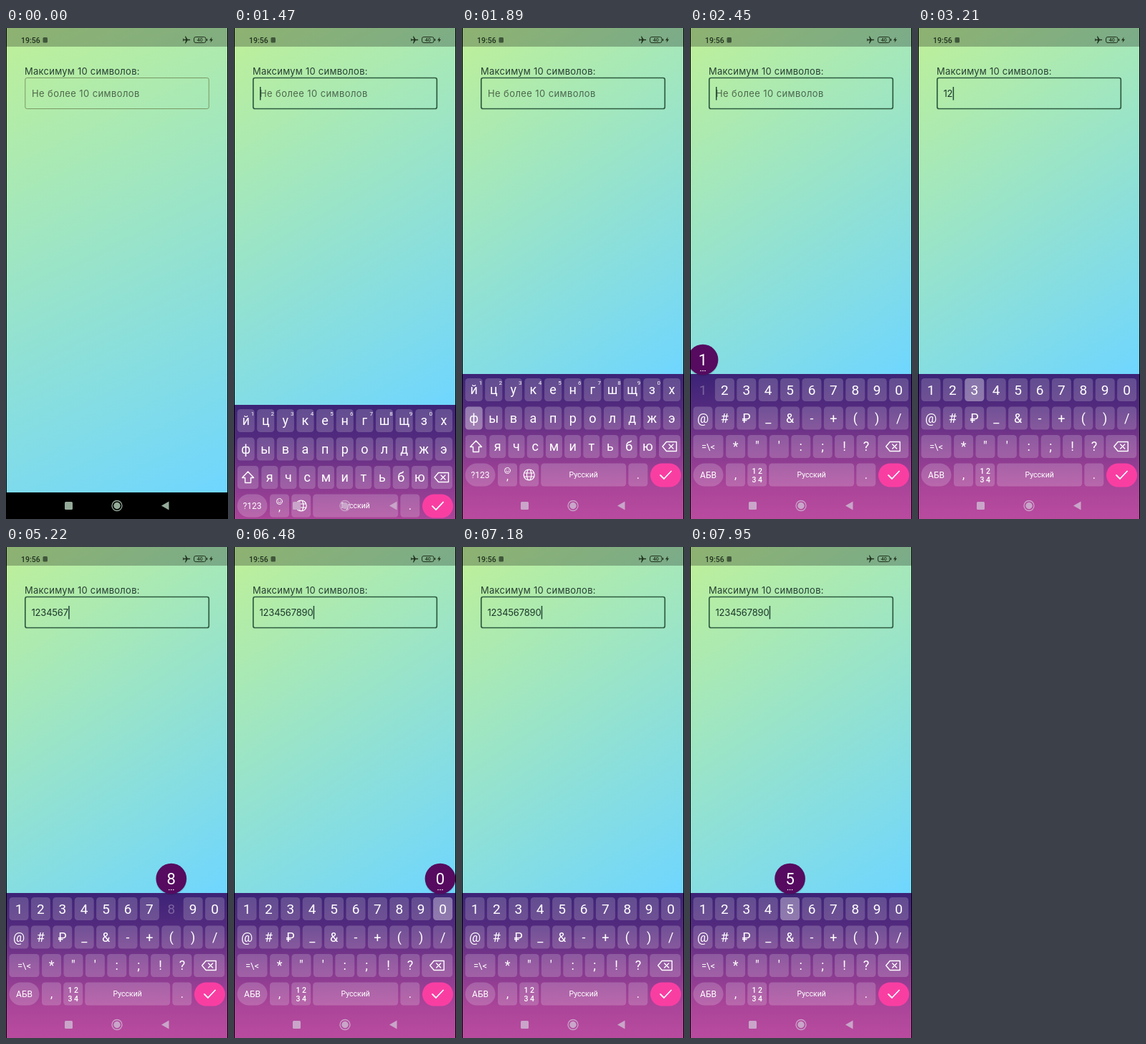
Animation of 310x684 px, one loop 8 s. Source, as an HTML page:

```html
<!DOCTYPE html>
<html lang="ru">
<head>
<meta charset="utf-8">
<title>Поле ввода</title>
<style>
html, body { margin: 0; width: 100%; height: 100%; overflow: hidden; background: #000; }
svg { display: block; width: 310px; height: 684px; }
text { font-family: Roboto, "Noto Sans", sans-serif; white-space: pre; }
.form text { font-family: Inter, Roboto, sans-serif; font-size: 13px; }
.label { fill: #263f32; letter-spacing: .25px; }
.hint { fill: #000; fill-opacity: .56; letter-spacing: .4px; }
.form .value { fill: #1c382b; letter-spacing: -.2px; }
.status { fill: #22321f; }
.kb text { fill: #fff; text-anchor: middle; }
.kb .line { fill: none; stroke: #fff; stroke-width: 1.4; stroke-linejoin: round; stroke-linecap: round; }
.cap { fill: #fff; fill-opacity: .19; }
.hot .cap { fill-opacity: .38; }
.down { opacity: .28; }
.down .cap { fill-opacity: 0; }
</style>
</head>
<body>
<svg viewBox="0 0 310 684">
  <defs>
    <linearGradient id="sky" gradientUnits="userSpaceOnUse" x1="1" y1="0" x2="309" y2="647">
      <stop offset="0" stop-color="#bff098"/><stop offset="1" stop-color="#6fd6ff"/>
    </linearGradient>
    <linearGradient id="plum" x1="0" y1="0" x2="0" y2="1">
      <stop offset="0" stop-color="#3c2376"/><stop offset=".25" stop-color="#542b7f"/>
      <stop offset=".5" stop-color="#80388e"/><stop offset=".78" stop-color="#aa4599"/>
      <stop offset="1" stop-color="#b94b9f"/>
    </linearGradient>
    <clipPath id="screen"><rect x="1" width="308" height="684"/></clipPath>
  </defs>
  <rect width="310" height="684"/>
  <g clip-path="url(#screen)">
    <rect id="page" x="1" width="308" height="647" fill="url(#sky)"/>
    <rect x="1" width="308" height="26" fill-opacity=".26"/>
    <g class="status">
      <text x="21" y="20.5" font-size="10.5" font-weight="500">19:56</text>
      <rect x="51.5" y="13" width="6.5" height="7.5" rx="1.5" fill="#40563a"/>
      <path transform="translate(252 16.5) rotate(90) scale(.52) translate(-11.5 -12)" d="M21 16v-2l-8-5V3.5c0-.83-.67-1.5-1.5-1.5S10 2.67 10 3.5V9l-8 5v2l8-2.5V19l-2 1.5V22l3.5-1 3.5 1v-1.5L13 19v-5.5l8 2.5z"/>
      <rect x="262.5" y="12.5" width="16.5" height="8" rx="2.5" fill="none" stroke="#22321f"/>
      <rect x="279.8" y="15" width="1.4" height="3"/>
      <text x="270.7" y="19" font-size="7" font-weight="500" text-anchor="middle">40</text>
      <path d="M287.5 12.5l-3.5 4.700h2.200l-.7 3.300 3.500-4.700h-2.200z"/>
    </g>
    <g class="form">
      <text class="label" x="26" y="64.500">Максимум 10 символов:</text>
      <rect id="field" x="26.800" y="69.500" width="256.500" height="43" rx="2.500" fill="none"/>
      <text id="hint" class="hint" x="36" y="96">Не более 10 символов</text>
      <text id="value" class="value" x="35.500" y="96"></text>
      <rect id="caret" y="82" width="1.500" height="18.500" fill="#24483a"/>
    </g>
    <g id="kb" class="kb">
      <rect x="1" y="482" width="308" height="202" fill="url(#plum)"/>
      <g id="letters"></g>
      <g id="symbols"></g>
      <g id="common"></g>
      <g id="popup">
        <circle cy="463" r="21.800" fill="#000" opacity=".12"/>
        <circle cy="462" r="21.300" fill="#560a60"/>
        <text id="big" y="470" font-size="22"></text>
        <g fill="#fff"><circle cx="-3" cy="477.500" r=".8"/><circle cy="477.500" r=".8"/><circle cx="3" cy="477.500" r=".8"/></g>
      </g>
    </g>
    <g id="nav">
      <rect x="82" y="660" width="11" height="11" rx="1.500"/>
      <circle cx="155" cy="665.500" r="4.700"/>
      <circle cx="155" cy="665.500" r="7" fill="none" stroke-width="1.300"/>
      <path d="M217 665.500L227.500 659.500V671.500Z"/>
    </g>
  </g>
</svg>
<script>
const $ = id => document.getElementById(id);
const NS = 'http://www.w3.org/2000/svg';

function add(parent, tag, attrs, text) {
  const el = document.createElementNS(NS, tag);
  for (const k in attrs) el.setAttribute(k, attrs[k]);
  if (text) el.textContent = text;
  return parent.appendChild(el);
}

const keys = {};
const TOPS = [488, 527.5, 567, 606.5];

// One key: cap centred on cx, optional glyph
function key(layer, id, cx, row, w, size = 18, glyph = id, rx = 4.5) {
  const g = add(layer, 'g', {}), y = TOPS[row];
  add(g, 'rect', { class: 'cap', x: cx - w / 2, y, width: w, height: 32, rx });
  if (glyph) add(g, 'text', { x: cx, y: y + 16 + size * .36, 'font-size': size }, glyph);
  return keys[id] = { g, cx };
}

function keyRow(layer, chars, row, first, pitch, w, size) {
  [...chars].forEach((c, i) => key(layer, c, first + i * pitch, row, w, size));
}

function backspace(layer, cx, w) {
  const { g } = key(layer, 'back' + cx, cx, 2, w, 0, '');
  add(g, 'path', { class: 'line', d: `M${cx - 10} 583l5.500-6.500h14v13h-14zM${cx - 1} 580l6 6m0-6l-6 6` });
}

const letters = $('letters'), symbols = $('symbols'), common = $('common');

keyRow(letters, 'йцукенгшщзх', 0, 16.6, 27.63, 24.2, 18);
[...'1234567890'].forEach((d, i) =>
  add(letters, 'text', { x: 26 + i * 27.63, y: 496.5, 'font-size': 8 }, d));
keyRow(letters, 'фывапролджэ', 1, 16.6, 27.63, 24.2, 18);
const shift = key(letters, 'shift', 19.5, 2, 29.5, 0, '');
add(shift.g, 'path', { class: 'line', d: 'M19.500 575l-8 8.500h4v7h8v-7h4z' });
keyRow(letters, 'ячсмитьбю', 2, 49.8, 26.2, 23, 18);
backspace(letters, 290, 30);
key(letters, 'mode', 25.5, 3, 42, 12, '?123', 16);
const comma = key(letters, 'smile', 63.5, 3, 27, 0, '');
add(comma.g, 'circle', { class: 'line', cx: 63.5, cy: 616.5, r: 4, 'stroke-width': 1 }).style.strokeWidth = 1;
add(comma.g, 'path', { class: 'line', d: 'M61.500 617.500q2 2 4 0M62 615.200v.1M65 615.200v.1' }).style.strokeWidth = 1;
add(comma.g, 'text', { x: 63.5, y: 630, 'font-size': 15 }, ',');
const globe = key(letters, 'globe', 93.7, 3, 27, 0, '');
add(globe.g, 'path', { class: 'line',
  d: 'M86.200 622.500a7.500 7.500 0 1 0 15 0a7.500 7.500 0 1 0-15 0M90.500 622.500a3.200 7.500 0 1 0 6.400 0a3.200 7.500 0 1 0-6.400 0M87 620h13.400M87 625h13.400' })
  .style.strokeWidth = 1.2;

keyRow(symbols, '1234567890', 0, 18, 30.4, 27, 19);
keyRow(symbols, '@#₽_&-+()/', 1, 18, 30.4, 27, 18);
key(symbols, 'more', 25.5, 2, 42, 13, '=\\<');
keyRow(symbols, '*"\':;!?', 2, 63.6, 30.4, 27, 18);
backspace(symbols, 283.7, 43);
key(symbols, 'abc', 25.5, 3, 42, 12, 'АБВ', 16);
key(symbols, ',', 63.5, 3, 27, 16);
const pad = key(symbols, 'pad', 93.7, 3, 27, 0, '');
['1 2', '3 4'].forEach((s, i) =>
  add(pad.g, 'text', { x: 93.7, y: 621 + i * 11.5, 'font-size': 10.5, 'font-weight': 500 }, s));

key(common, 'space', 169.7, 3, 119, 10.5, 'Русский');
key(common, '.', 245.8, 3, 27, 16);
add(common, 'rect', { x: 263, y: 606.5, width: 43, height: 33, rx: 16.5, fill: '#f93ea2' });
add(common, 'path', { class: 'line', d: 'M277 623l5 5 10-10.500' }).style.strokeWidth = 1.8;

const LOOP = 8000, FOCUS = 1180, CARET = 1250, SLIDE = 1330, SWITCH = 2160;
const TYPE = 100, RELEASE = 200;

// Digits: first eight at a steady beat, two slower, then quick ignored taps
const taps = [];
for (let i = 0; i < 15; i++) {
  const at = i < 8 ? 2398 + i * 396 : i < 10 ? 5170 + (i - 7) * 580 : 6330 + (i - 9) * 294;
  taps.push({ at, c: String((i + 1) % 10) });
}
const holds = [
  { id: 'ф', from: 1820, to: 1960 },
  { id: 'mode', from: 2060, to: SWITCH }
];

const show = (el, on) => el.setAttribute('visibility', on ? 'visible' : 'hidden');
const display = (el, on) => { el.style.display = on ? '' : 'none'; };
const clamp = v => Math.max(0, Math.min(1, v));

function draw(t) {
  const left = (1 - clamp((t - SLIDE) / 350)) ** 3;
  const drop = 202 * left;
  const bottom = Math.min(647, 482 + drop);
  $('kb').setAttribute('transform', `translate(0 ${drop})`);
  $('page').setAttribute('height', bottom);
  $('sky').setAttribute('y2', bottom);
  const navColor = t < SLIDE ? '#94ab99' : '#c9a5c9';
  $('nav').setAttribute('fill', navColor);
  $('nav').setAttribute('stroke', t < SLIDE ? '#94ab99' : '#c9a5c9');
  $('nav').setAttribute('stroke-width', 0);

  const f = clamp((t - FOCUS) / 120);
  $('field').setAttribute('stroke', f > 0 ? '#2f5c40' : '#7b9a65');
  $('field').setAttribute('stroke-width', 1 + .7 * f);

  display(letters, t < SWITCH);
  display(symbols, t >= SWITCH);

  // Text and caret
  const done = taps.filter(p => t >= p.at + TYPE);
  const value = done.slice(0, 10).map(p => p.c).join('');
  $('value').textContent = value;
  show($('hint'), !value);
  const since = t - (done.length ? done[done.length - 1].at + TYPE : CARET);
  show($('caret'), since >= 0 && since % 1000 < 500);
  $('caret').setAttribute('x', value ? 35.8 + $('value').getComputedTextLength() : 36);

  // Pressed keys
  for (const id in keys) keys[id].g.removeAttribute('class');
  for (const h of holds)
    if (t >= h.from && t < h.to) keys[h.id].g.setAttribute('class', 'hot');
  const tap = taps.find(p => t >= p.at && t < p.at + RELEASE);
  const age = tap ? t - tap.at : 0;
  if (tap) keys[tap.c].g.setAttribute('class', age >= 40 && age < TYPE ? 'down' : 'hot');
  display($('popup'), tap && age >= 40);
  if (tap) {
    $('big').textContent = tap.c;
    $('popup').setAttribute('transform', `translate(${Math.min(288, keys[tap.c].cx)} 0)`);
  }
}

function frame() {
  draw(performance.now() % LOOP);
  requestAnimationFrame(frame);
}
frame();
</script>
</body>
</html>
```
